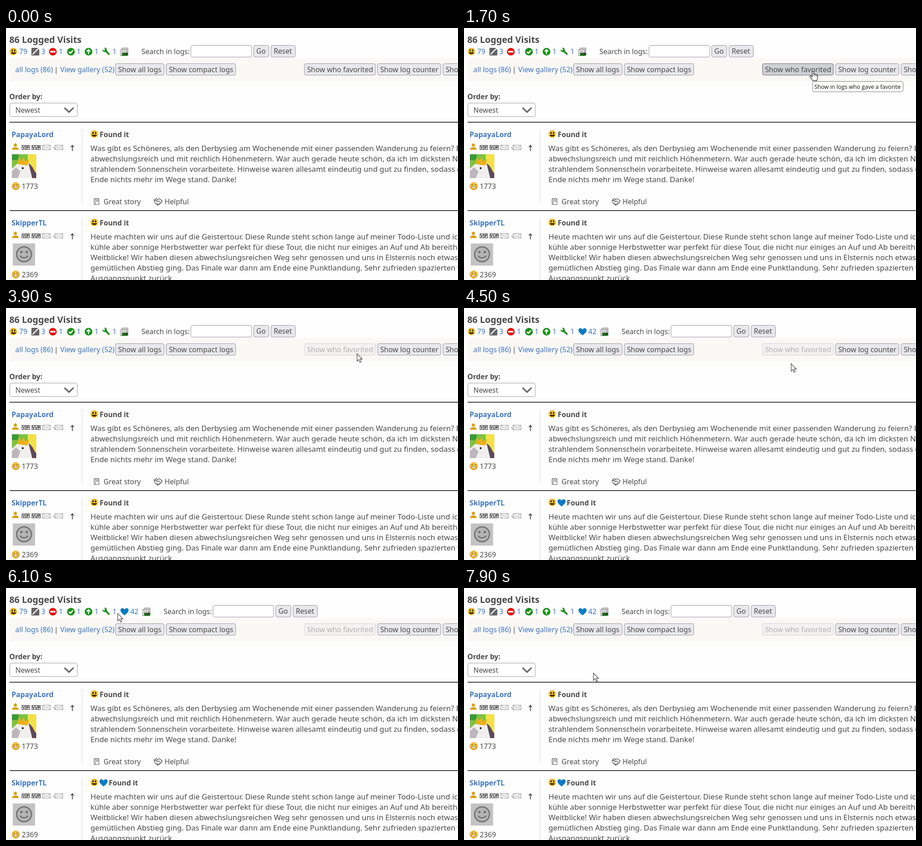
Write an HTML page that moves like this. It is 1001 by 559 pixels and loops after 8000 ms.

```html
<!DOCTYPE html>
<html lang="en">
<head>
<meta charset="utf-8">
<title>Logged visits</title>
<style>
html, body { margin: 0; width: 100%; height: 100%; overflow: hidden; background: #fefefe; }
svg { display: block; width: 100%; height: 100%; }
text { font: 15.75px "Noto Sans", sans-serif; fill: #4a4a4a; white-space: pre; }
.b { font-weight: 700; }
.h { font-size: 19.95px; font-weight: 700; }
.a { fill: #3d76c5; }
.body { font-size: 16.8px; }
.tag { font-size: 8.4px; font-weight: 700; fill: #111; }
.tip { font: 12.65px "Open Sans", sans-serif; fill: #111; }
.btn rect { fill: #e9e9ed; stroke: #8f8f9d; }
.btn.hover rect { fill: #d0d0d7; stroke: #676774; }
.btn.active rect { fill: #b1b1b9; stroke: #484851; }
.btn.off { opacity: .4; }
</style>
</head>
<body>
<svg id="stage" viewBox="0 0 1001 559" preserveAspectRatio="none"></svg>
<script>
const txt = (x, y, s, c = '') => `<text x="${x}" y="${y}" class="${c}">${s}</text>`;
const at = (x, y, s, id = '') => `<g ${id && `id="${id}"`} transform="translate(${x} ${y})">${s}</g>`;
const path = (d, fill = 'none', stroke = 'none', w = 1) =>
  `<path d="${d}" fill="${fill}" stroke="${stroke}" stroke-width="${w}"/>`;
const rect = (x, y, w, h, fill, more = '') =>
  `<rect x="${x}" y="${y}" width="${w}" height="${h}" fill="${fill}" ${more}/>`;
const disc = (r, fill, more = '') => `<circle r="${r}" fill="${fill}" ${more}/>`;

const button = (id, x, y, w, h, label) =>
  `<g class="btn" id="${id}">${rect(x, y, w, h, '', 'rx="3.5"')}${txt(x + 5.7, y + 18.5, label)}</g>`;

// icons, each around its own centre
const smile = disc(8.4, 'url(#sun)') +
  '<ellipse cx="-2.8" cy="-2.4" rx="1.4" ry="2.5" fill="#222"/><ellipse cx="2.8" cy="-2.4" rx="1.4" ry="2.5" fill="#222"/>' +
  path('M-5.6 1.6H5.6C5 7.4 -5 7.4 -5.6 1.6Z', '#3a2208') + path('M-2.8 5Q0 3.2 2.8 5Q0 6.4 -2.8 5Z', '#c8402c');
const grin = disc(8.3, 'url(#coin)', 'stroke="#d89a1c"') +
  path('M-4.6 -2.2Q-3 -4.4 -1.4 -2.2M1.4 -2.2Q3 -4.4 4.6 -2.2', 'none', '#7a4a08', 1.3) +
  path('M-5.4 1H5.4C4.6 6.4 -4.6 6.4 -5.4 1Z', '#fff6dc', '#8a5510', 1);
const note = rect(-8.7, -8.6, 17.5, 17.2, '#636363', 'rx="1.5"') +
  path('M-6.8 6.8L-5.6 3L-2.9 5.7Z', '#fff') + path('M-4.2 3.8L5.5 -5.8', 'none', '#fff', 2.6) +
  path('M8.8 -8.6V-3.8L4.2 -8.6Z', '#fefefe');
const stop = disc(8.6, '#e1100f') + rect(-5.8, -1.8, 11.6, 3.7, '#fff');
const check = disc(8.6, '#1b9019') + path('M-4.6 .2L-1.4 3.5L4.6 -3', 'none', '#fff', 2.6);
const up = disc(8.6, '#1b9019') + path('M0 5.5V-3.5M-4 -.4L0 -4.4L4 -.4', 'none', '#fff', 2.4);
const wrench = path('M-2 -2L6.8 6.8', 'none', '#1f8f1c', 4) +
  path('M-8.6 -5.2L-5.3 -2.2L-2.5 -5L-5.6 -8.4C-2 -9.6 2 -6.5 .8 -2.2L-2.2 .8C-6.4 1.6 -9.4 -1.6 -8.6 -5.2Z', '#1f8f1c') +
  disc(.9, '#fff', 'cx="6" cy="6"');
const heart = path('M0 8.2C-4 4.6 -9 1.2 -9 -3.1C-9 -8.4 -2.4 -9.4 0 -4.6C2.4 -9.4 9 -8.4 9 -3.1C9 1.2 4 4.6 0 8.2Z', '#0a7bc4');
const pages = rect(-4, -8.3, 12, 13, '#fff', 'stroke="#777"') + rect(-6, -6.2, 12, 13, '#fff', 'stroke="#777"') +
  rect(-8, -4, 12, 13, '#fff', 'stroke="#666"') + path('M-6 -1H2M-6 1H2', 'none', '#888') +
  rect(-5.5, 2.4, 14, 7, '#3aa335') + `<text x="-5" y="8.8" class="tag" style="font-size:8px">VIP</text>`;
const mail = rect(-8.5, -5, 17, 10, '#fff', 'stroke="#8a8a8a"') +
  path('M-8.5 -5L0 1.5L8.5 -5M-8.5 5L-2.4 -.3M8.5 5L2.4 -.3', 'none', '#8a8a8a', .9);
const person = disc(3.6, '#d8a412', 'cy="-3.8"') + path('M-7.4 6.4C-7.2 1.6 -3.4 .8 0 .8S7.2 1.6 7.4 6.4Z', '#d8a412');
const badge = (x, w, s) => rect(x, 260.5, w, 9, '#fff', 'stroke="#222" stroke-width="1.1"') +
  `<text x="${x + w / 2}" y="268" text-anchor="middle" class="tag">${s}</text>`;
const book = path('M-5.5 -6.5H5.5V6.5H-5.5ZM-3 -6.5V6.5', '#fff', '#555') + path('M0 -6V0L1.7 -1.6L3.4 0V-6', 'none', '#555');
const shake = path('M-9 -2.5L-4 -7.5L-1 -5L3 -7L9 -1.5L6 3L-1 8L-6.5 3.5ZM-1 -5L-3.5 -1Q-1 1 1.5 -2.2L6 3M-5 4.5L-3 2M-3 6.3L-.8 3.8M1 6.5L-1 4.5M3.6 4.8L1 2', '#fff', '#444', 1.1) +
  path('M-9 -2.5L-7 -4.6L-4.5 -1.6M9 -1.5L7 -3.5', 'none', '#444', 1.6);

const pony = `<g clip-path="url(#pic)">${rect(13, 280, 54, 53, '#7fc241')}` +
  rect(48, 280, 19, 53, '#f3e04a') + rect(13, 280, 15, 13, '#3b9a37') +
  path('M13 312L24 302L34 296L52 300L64 333H13Z', '#f1eef0') + path('M13 318L22 309L32 318L26 333H13Z', '#bdb6bd') +
  path('M50 300C60 306 62 318 67 322V333H58Z', '#5b4a57') + path('M26 302L27 288L34 294L39 287L43 295L51 292L48 305Z', '#eab11c') +
  disc(2.2, '#2b2430', 'cx="37" cy="311"') + '</g>';
const blank = rect(15, 282, 49.5, 49, '#c3c3c3') + disc(16.5, '#b4b4b4', 'cx="40" cy="306" stroke="#757575" stroke-width="3"') +
  disc(2.5, '#666', 'cx="34" cy="301"') + disc(2.5, '#666', 'cx="46" cy="301"') +
  path('M31 309Q40 319 49 309', 'none', '#666', 2.6);

function entry(dy, user, count, avatar, lines, extra, id) {
  return at(0, dy,
    path('M8 209H1001', 'none', '#444', 2) +
    path(`M168.5 226V${extra ? 389 : 420}`, 'none', '#dcdcdc') +
    txt(12.3, 241.8, user, 'a b') + at(20.7, 263.5, person) +
    badge(35.5, 16.5, 'VIP') + badge(57.5, 18.5, 'VUP') + at(89.5, 265, mail) + at(117.3, 265, mail) +
    path('M104 265.5H109M105.5 268H109', 'none', '#8a8a8a') +
    path('M147 273V261M143.6 264.4L147 260.4L150.4 264.4', 'none', '#111', 1.3) +
    avatar + at(21.5, 351, grin) + txt(34.7, 357, count) +
    at(195.5, 235.5, smile) + at(207.6, 241.8, txt(0, 0, 'Found it', 'b'), id) +
    lines.map((s, i) => txt(187, 272.9 + i * 23, s, 'body')).join('') +
    (extra ? at(200.5, 385, book) + txt(216, 391, 'Great story') + at(337, 385.5, shake) + txt(351.3, 391, 'Helpful') : ''));
}

const counts = [[smile, 16.5, '79', 29.3], [note, 65, '3', 78], [stop, 103.7, '1', 117],
  [check, 143.8, '1', 156.5], [up, 182.8, '1', 196], [wrench, 222.5, '1', 235.7]];

const stage = document.getElementById('stage');
stage.innerHTML = `<defs>
  <linearGradient id="sun" x1="0" y1="0" x2="0" y2="1"><stop stop-color="#eda91b"/><stop offset="1" stop-color="#fbe344"/></linearGradient>
  <radialGradient id="coin"><stop stop-color="#fde36c"/><stop offset="1" stop-color="#f2b62c"/></radialGradient>
  <clipPath id="pic">${rect(13, 280, 54, 53, '#000')}</clipPath></defs>` +
  rect(0, 0, 1001, 559, '#fefefe') + rect(8, 67, 993, 51, '#faf8f5') +
  txt(7.2, 33, '86 Logged Visits', 'h') +
  counts.map(([icon, x, n, nx]) => at(x, 52.5, icon) + txt(nx, 57.8, n, 'a')).join('') +
  at(0, 0, at(262.5, 52.5, heart) + txt(275.3, 57.8, '42', 'a'), 'fav') +
  at(0, 0, at(262, 52.5, pages) + txt(300, 57.8, 'Search in logs:') +
    rect(409.5, 38.5, 134.5, 26, '#fff', 'rx="4" stroke="#8f8f9d"') +
    button('go', 548.5, 38.5, 33.5, 26, 'Go') + button('reset', 587, 38.5, 53.5, 26, 'Reset'), 'search') +
  txt(20.6, 97.6, 'all logs (86)', 'a') + txt(106.8, 97.6, '|') + txt(120, 97.6, 'View gallery (52)', 'a') +
  button('all', 242.5, 79, 107.5, 25.5, 'Show all logs') +
  button('compact', 355, 79, 153.5, 25.5, 'Show compact logs') +
  button('who', 661, 79, 157, 25.5, 'Show who favorited') +
  button('counter', 823, 79, 140, 25.5, 'Show log counter') +
  button('more', 968, 79, 140, 25.5, 'Show details') +
  txt(7.5, 157.7, 'Order by:', 'b') + rect(8.5, 166.5, 149.5, 30, '#fff', 'rx="4" stroke="#9b9b9b"') +
  txt(20.8, 187.8, 'Newest') + path('M129.5 177L139.5 186.5L149.5 177', 'none', '#666', 3.2) +
  entry(0, 'PapayaLord', '1773', pony, [
    'Was gibt es Schöneres, als den Derbysieg am Wochenende mit einer passenden Wanderung zu feiern? Eine',
    'abwechslungsreich und mit reichlich Höhenmetern. War auch gerade heute schön, da ich im dicksten Nebel',
    'strahlendem Sonnenschein vorarbeitete. Hinweise waren allesamt eindeutig und gut zu finden, sodass dem',
    'Ende nichts mehr im Wege stand. Danke!'], true, 'found1') +
  entry(196, 'SkipperTL', '2369', blank, [
    'Heute machten wir uns auf die Geistertour. Diese Runde steht schon lange auf meiner Todo-Liste und ich',
    'kühle aber sonnige Herbstwetter war perfekt für diese Tour, die nicht nur einiges an Auf und Ab bereithielt',
    'Weitblicke! Wir haben diesen abwechslungsreichen Weg sehr genossen und uns in Elsternis noch etwas',
    'gemütlichen Abstieg ging. Das Finale war dann am Ende eine Punktlandung. Sehr zufrieden spazierten wir',
    'Ausgangspunkt zurück.'], false, 'found2') +
  at(216, 432, heart, 'mark') +
  at(0, 0, rect(772, 118.5, 200.5, 23, '#fff', 'rx="4" stroke="#777"') +
    txt(775.7, 134.8, 'Show in logs who gave a favorite', 'tip'), 'tip') +
  at(0, 0, path('M.5 .5V17L4.3 13.4L7 19.5L9.6 18.4L7 12.4H12Z', '#fff', '#333', 1.1), 'arrow') +
  at(0, 0, path('M-1.7 1.8C-1.7 -.2 1.6 -.2 1.6 1.8V7.2C2.4 5.8 4.8 6 4.9 7.8C5.8 6.8 7.6 7.2 7.8 8.8C9 8.2 10.2 9 10.2 10.4V14C10.2 17 8.6 18 8.3 21.4H-1.2C-1.5 18.5 -4.5 16 -6.6 12.8C-7.8 11 -5.6 9.7 -4.1 11L-1.7 13.2Z', '#fff', '#222', 1.2) +
    path('M1.6 7V11M4.9 8V11.4M7.8 9V11.8', 'none', '#222', 1), 'hand');

// pointer gestures: start time, then one place per 100 ms; the last place holds
const gestures = [
  [400, [[975, 134], [899, 130], [851, 134], [821, 136], [795, 122], [781, 106], [776, 99], [774, 96], [773, 95.5]]],
  [3900, [[777, 101], [781, 108]]],
  [4300, [[797, 113], [750, 121], [724, 123], [703, 130], [641, 136], [579, 146], [504, 157], [488, 166]]],
  [5200, [[399, 160], [319, 144], [293, 112], [279.5, 79.5], [264, 58], [252, 42], [246, 46], [243, 57], [245, 66]]],
  [6100, [[247, 56], [255, 43], [268, 38], [281, 40], [290, 46], [296, 52], [300, 57], [301, 60], [301, 60]]],
  [7800, [[292, 88], [286, 188]]]
];

const $ = id => document.getElementById(id);
const show = (id, on) => $(id).setAttribute('visibility', on ? 'visible' : 'hidden');
const move = (id, x, y) => $(id).setAttribute('transform', `translate(${x} ${y})`);
const inside = ([x, y], l, t, r, b) => x > l && x < r && y > t && y < b;

function draw(ms) {
  const t = Math.floor(ms / 100) * 100;
  const g = gestures.filter(([start]) => start <= t).pop();
  const p = g ? g[1][Math.min((t - g[0]) / 100, g[1].length - 1)] : [-50, -50];

  const onWho = inside(p, 661, 79, 818, 104);
  const onAll = inside(p, 242, 79, 350, 104);
  const onLink = inside(p, 235, 44, 246, 60) || inside(p, 275, 44, 294, 60);
  const hand = onWho && t < 3900 || onAll || onLink;
  show('hand', g && hand);
  show('arrow', g && !hand);
  move('hand', ...p);
  move('arrow', ...p);

  $('who').setAttribute('class', 'btn ' + (t >= 3600 ? 'off' : t >= 3500 ? 'active' : onWho ? 'hover' : ''));
  $('all').setAttribute('class', onAll ? 'btn hover' : 'btn');
  show('tip', t >= 1700 && t < 3400);

  const marked = t >= 4300;
  show('fav', marked);
  show('mark', marked);
  move('search', marked ? 49 : 0, 0);
  move('found2', marked ? 227.6 : 207.6, 241.8);
}

const begin = performance.now();
function tick() {
  draw((performance.now() - begin) % 8000);
  requestAnimationFrame(tick);
}
tick();
</script>
</body>
</html>
```
